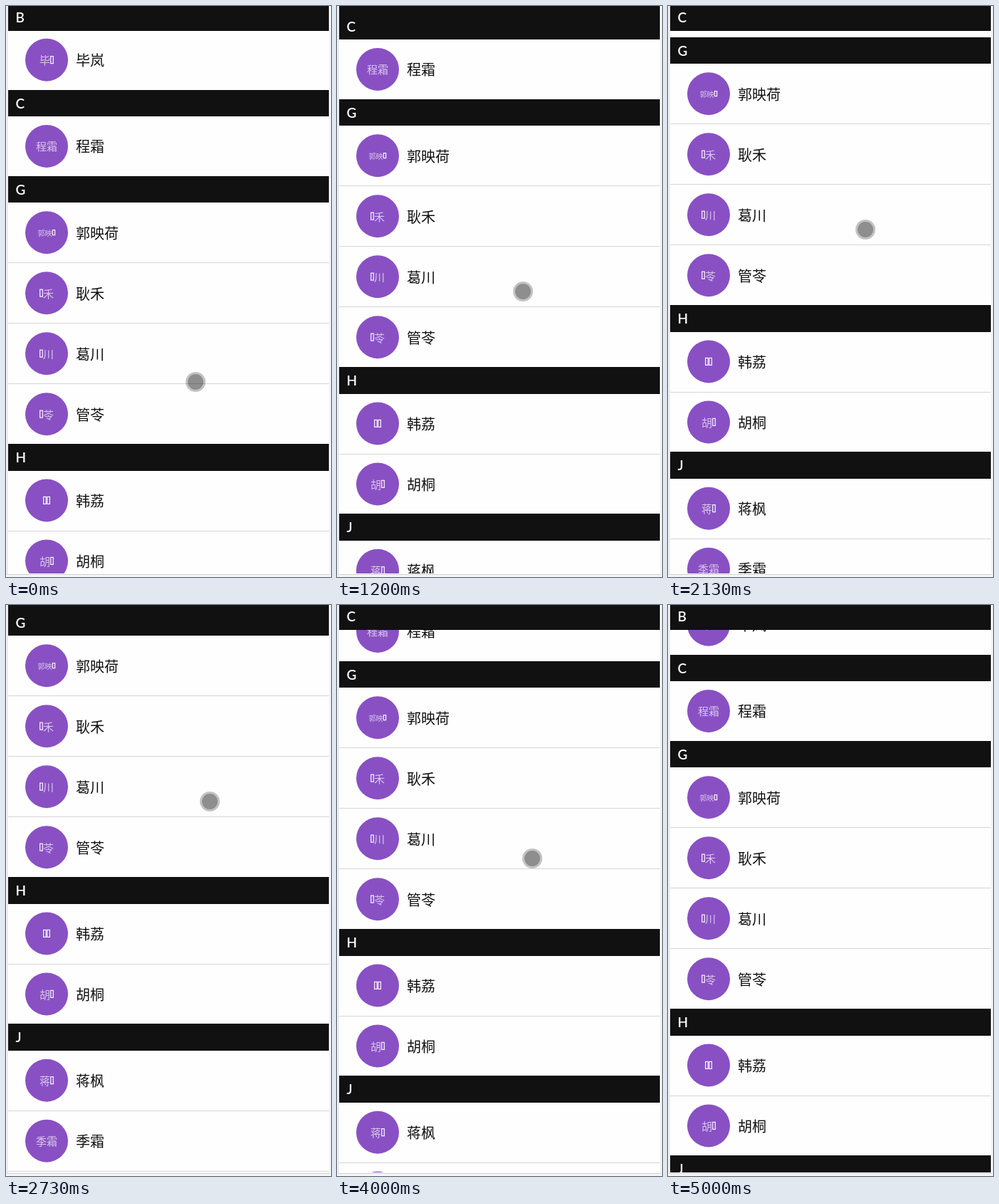
An HTML page with a canvas for the animation above (5270 ms loop, 456 by 802 pixels).

```html
<!DOCTYPE html>
<html lang="zh-CN">
<head>
<meta charset="utf-8">
<title>Sticky contact list</title>
<style>
html, body { margin: 0; width: 100%; height: 100%; overflow: hidden; background: #fff; }
canvas { display: block; width: 456px; height: 802px; }
</style>
</head>
<body>
<canvas id="stage" width="456" height="802"></canvas>
<script>
const ctx = document.getElementById('stage').getContext('2d');
const W = 456, H = 802, LOOP = 5270, TICK = 200 / 3;
const LEFT = 3, RIGHT = 453, BOTTOM = 797;
const HEAD = 37.5, ROW = 83.75, LINE = 1.25, TOP = -3, HEAD_SHIFT = 0.75;
const CJK = '"Noto Sans CJK SC", "Noto Sans CJK", sans-serif';

// Each row: name, avatar label (□ is an empty glyph box)
const groups = [
  { letter: 'B', rows: [['毕岚', '毕□']] },
  { letter: 'C', rows: [['程霜', '程霜']] },
  { letter: 'G', rows: [['郭映荷', '郭映□'], ['耿禾', '□禾'], ['葛川', '□川'], ['管苓', '□苓']] },
  { letter: 'H', rows: [['韩荔', '□□'], ['胡桐', '胡□']] },
  { letter: 'J', rows: [['蒋枫', '蒋□'], ['季霜', '季霜'], ['', '']] }
];
let edge = TOP;
for (const g of groups) {
  g.top = edge;
  edge += HEAD + g.rows.length * (ROW + LINE) - LINE;
  g.end = edge;
}

// Keys are [tick, value]
const scrollKeys = [[6, 0], [7, 5], [9, 20], [11, 39], [13, 59], [18, 108], [24, 153], [33, 200],
  [41, 233], [45, 238], [49, 238], [54, 222], [57, 205], [60, 160], [65, 108], [71, 52], [74, 52], [75, 48]];
const gripKeys = [[6, 528], [9, 508], [24, 509], [45, 509], [54, 519], [60, 516], [71, 514]];
const dotXKeys = [[6, 266], [13, 259], [24, 267], [41, 286], [49, 287], [54, 285], [60, 274], [71, 264]];

// Monotone cubic interpolation
function curve(keys, x) {
  const n = keys.length - 1;
  if (x <= keys[0][0]) return keys[0][1];
  if (x >= keys[n][0]) return keys[n][1];
  const slope = i => (keys[i + 1][1] - keys[i][1]) / (keys[i + 1][0] - keys[i][0]);
  const tangent = i => {
    if (i === 0 || i === n) return slope(Math.min(i, n - 1));
    const a = slope(i - 1), b = slope(i);
    return a * b <= 0 ? 0 : 2 * a * b / (a + b);
  };
  let i = 0;
  while (x > keys[i + 1][0]) i++;
  const [x0, y0] = keys[i], [x1, y1] = keys[i + 1];
  const h = x1 - x0, u = (x - x0) / h, v = 1 - u;
  return y0 * (1 + 2 * u) * v * v + y1 * u * u * (3 - 2 * u) +
    h * u * v * (tangent(i) * v - tangent(i + 1) * u);
}

function rect(x, y, w, h, color) {
  ctx.fillStyle = color;
  ctx.fillRect(x, y, w, h);
}

function disc(x, y, r, color) {
  ctx.fillStyle = color;
  ctx.beginPath();
  ctx.arc(x, y, r, 0, Math.PI * 2);
  ctx.fill();
}

function text(str, x, y, font, color) {
  ctx.font = font;
  ctx.fillStyle = color;
  ctx.fillText(str, x, y);
}

function avatar(label, y) {
  disc(57, y, 30, '#8950c4');
  const size = label.length > 2 ? 10 : 15;
  const box = size > 10 ? 5.2 : 4.8, tall = size > 10 ? 10 : 7;
  const chars = [...label];
  const width = c => c === '□' ? box : size;
  let x = 57 - chars.reduce((sum, c) => sum + width(c), 0) / 2;
  for (const c of chars) {
    if (c === '□') {
      ctx.strokeStyle = 'rgba(255,255,255,.95)';
      ctx.lineWidth = 1.2;
      ctx.strokeRect(x + 0.8, y - tall / 2, box - 1.6, tall);
    } else {
      text(c, x, y + 1 + size * 0.37, size + 'px ' + CJK, 'rgba(255,255,255,.68)');
    }
    x += width(c);
  }
}

function drawRows(g, scroll) {
  g.rows.forEach(([name, label], i) => {
    const y = g.top + HEAD + i * (ROW + LINE) - scroll;
    if (y > H || y < -ROW) return;
    if (name) {
      avatar(label, y + 41.15);
      text(name, 98, Math.round(y + 49.7), '350 20px ' + CJK, '#111');
    }
    if (i < g.rows.length - 1) rect(LEFT, Math.floor(y + ROW), RIGHT - LEFT, 1, '#d6d6d6');
  });
}

function drawHead(g, scroll) {
  const pinned = Math.max(g.top - HEAD_SHIFT - scroll, TOP);
  const y = Math.min(pinned, g.end - HEAD_SHIFT - HEAD - scroll);
  if (y > H || y < -HEAD) return;
  const top = Math.round(y), bottom = Math.round(y + HEAD);
  rect(LEFT, top, RIGHT - LEFT, bottom - top, '#111');
  text(g.letter, 13.5, top + 26, '600 19px Lato, sans-serif', '#fff');
}

function draw(ms) {
  let tick = Math.ceil(ms / TICK) + 1;
  while (Math.round(tick * TICK / 10) * 10 > ms) tick--;
  const scroll = Math.round(curve(scrollKeys, tick));

  rect(0, 0, W, H, '#fff');
  rect(RIGHT, 0, W - RIGHT, H, '#f4f4f4');
  rect(0, BOTTOM + 2, W, H - BOTTOM - 2, '#f6f6f6');
  rect(1, 0, 1, BOTTOM + 2, '#d4d4d4');
  rect(1, BOTTOM + 1, RIGHT, 1, '#d0d0d0');

  ctx.save();
  ctx.beginPath();
  ctx.rect(LEFT, 0, RIGHT - LEFT, BOTTOM);
  ctx.clip();
  rect(LEFT, 0, RIGHT - LEFT, BOTTOM, '#fefefe');
  groups.forEach(g => drawRows(g, scroll));
  groups.forEach(g => drawHead(g, scroll));
  if (tick < 75) {
    const x = Math.round(curve(dotXKeys, tick));
    const y = Math.round(curve(gripKeys, tick)) - scroll;
    disc(x, y, 14, 'rgba(0,0,0,.23)');
    disc(x, y, 11, 'rgba(0,0,0,.27)');
  }
  ctx.restore();
}

const start = performance.now();
function loop() {
  draw((performance.now() - start) % LOOP);
  requestAnimationFrame(loop);
}
loop();
</script>
</body>
</html>
```
